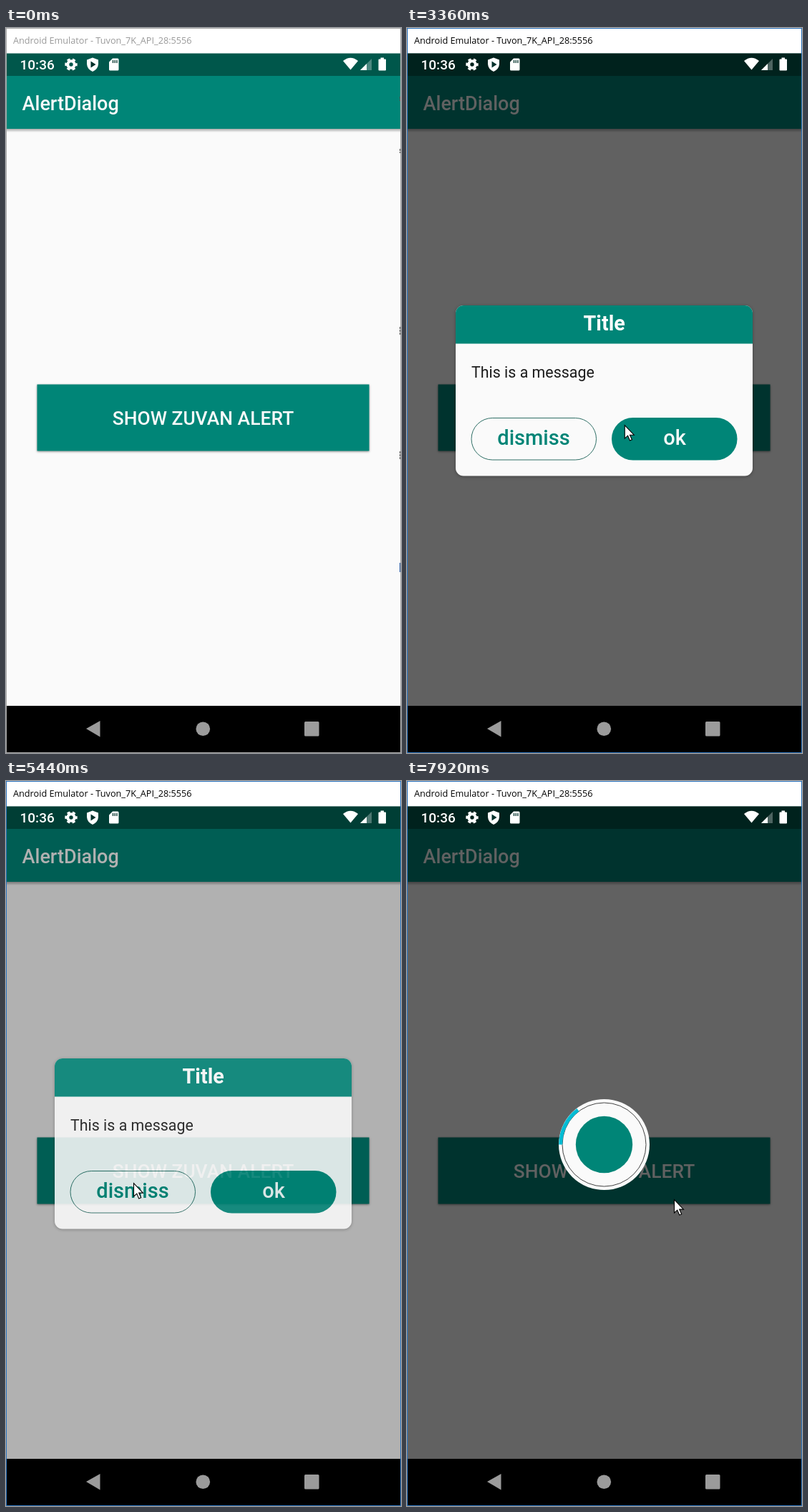
These frames come from a looping animation (552x1014 px, 8 s). An HTML page:

```html
<!DOCTYPE html>
<html lang="en">
<head>
<meta charset="utf-8">
<title>AlertDialog demo</title>
<style>
  html, body { margin: 0; width: 100%; height: 100%; overflow: hidden; background: #fff; }
  svg { display: block; width: 552px; height: 1014px; }
  text { font-family: Roboto, sans-serif; font-weight: 500; }
  .mid { text-anchor: middle; }
  #button { filter: drop-shadow(0 1px 1.5px rgba(0, 0, 0, .45)); }
  #dialog { filter: drop-shadow(0 1px 2px rgba(0, 0, 0, .3)); }
</style>
</head>
<body>
<svg viewBox="0 0 552 1014">
  <defs>
    <linearGradient id="shade" x2="0" y2="1">
      <stop stop-opacity=".32"/><stop offset="1" stop-opacity="0"/>
    </linearGradient>
    <clipPath id="window"><rect id="windowBox" width="552" height="1014"/></clipPath>
    <clipPath id="panel"><rect x="68" y="388" width="415" height="238.5" rx="11"/></clipPath>
    <clipPath id="dismissPill"><rect x="89.5" y="545" width="175.5" height="59.5" rx="29.7"/></clipPath>
    <clipPath id="okPill"><rect x="286" y="545" width="175.5" height="59.5" rx="29.7"/></clipPath>
  </defs>

  <!-- App screen -->
  <rect width="552" height="1014" fill="#fff"/>
  <text id="caption" x="10" y="22.3" style="font:400 12.7px 'Open Sans',sans-serif">Android Emulator - Tuvon_7K_API_28:5556</text>
  <rect y="36" width="552" height="912" fill="#fafafa"/>
  <rect y="35.5" width="552" height="32" fill="#00574b"/>
  <rect y="67" width="552" height="74" fill="#008577"/>
  <rect y="141" width="552" height="5" fill="url(#shade)"/>
  <text x="22.5" y="114.5" font-size="27" fill="#fafafa">AlertDialog</text>
  <g id="button"><rect x="43.5" y="498.5" width="464" height="93" fill="#008577"/></g>
  <text class="mid" x="275.5" y="555" font-size="26.4" fill="#fafafa">SHOW ZUVAN ALERT</text>
  <rect id="dim" y="35.5" width="552" height="913"/>

  <!-- Status bar -->
  <g fill="#fff">
    <text x="19.5" y="58" font-size="19">10:36</text>
    <g fill="none" stroke="#fff">
      <circle cx="91" cy="51" r="4.7" stroke-width="4"/>
      <circle cx="91" cy="51" r="7.3" stroke-width="2.8" stroke-dasharray="4.2 3.445" stroke-dashoffset="2.1"/>
    </g>
    <path d="M121 41.5L129 44.5V50.5Q128.500 57.500 121 61Q113.500 57.500 113 50.500V44.500Z"/>
    <path d="M118.500 46.500V55.500L125.500 51Z" fill="#00302a"/>
    <path d="M149 42.500H156Q157.500 42.500 157.500 44V58Q157.500 59.500 156 59.500H145.500Q144 59.500 144 58V47.500Z"/>
    <path d="M149.500 45V49M152.200 45V49M154.900 45V49" stroke="#00302a" stroke-width="1.300"/>
    <path d="M471 46Q481.500 37.500 492 46L481.500 58.500Z"/>
    <path d="M511 43V59H495Z" opacity=".3"/>
    <path d="M504 50V59H495Z"/>
    <path d="M523.500 41.500H528V43.500H530Q531 43.500 531 44.500V58.500Q531 59.500 530 59.500H521.500Q520.500 59.500 520.500 58.500V44.500Q520.500 43.500 521.500 43.500H523.500Z"/>
  </g>

  <!-- Navigation bar -->
  <rect y="948" width="552" height="66"/>
  <g fill="#9b9b9b">
    <path d="M112 980L131.500 969V991.500Z"/>
    <circle cx="275.300" cy="980.300" r="9.800"/>
    <rect x="417" y="970" width="20.500" height="20.500" rx="1.500"/>
  </g>

  <!-- Alert -->
  <g clip-path="url(#window)">
    <g id="dialog">
      <g clip-path="url(#panel)">
        <rect x="68" y="388" width="415" height="239" fill="#fafafa"/>
        <rect x="68" y="388" width="415" height="53.500" fill="#008577"/>
      </g>
      <text class="mid" x="275.700" y="423" font-size="28.700" fill="#fff" style="font-weight:700">Title</text>
      <text x="90" y="489" font-size="21.400" fill="#1b1b1b" style="font-weight:400">This is a message</text>
      <circle id="dismissRipple" cx="172" cy="575" fill="#e91e63" opacity=".48" clip-path="url(#dismissPill)"/>
      <rect x="90" y="545.500" width="174.500" height="58.500" rx="29.200" fill="none" stroke="#2f6f66"/>
      <text class="mid" x="177" y="582.500" font-size="29" fill="#008577">dismiss</text>
      <rect x="286" y="545" width="175.500" height="59.500" rx="29.700" fill="#008577"/>
      <text class="mid" x="374" y="582.500" font-size="29" fill="#fafafa">ok</text>
      <circle id="okRipple" cx="369" cy="575" fill="#e91e63" opacity=".48" clip-path="url(#okPill)"/>
    </g>
  </g>

  <!-- Loader -->
  <g id="loader">
    <circle cx="275.500" cy="508.500" r="63.500" fill="#fafafa"/>
    <circle cx="275.500" cy="508.500" r="58.500" fill="none" stroke="#444"/>
    <circle cx="275.500" cy="508.500" r="39.700" fill="#008577"/>
    <path id="arc" fill="none" stroke="#00bcd4" stroke-width="5"/>
  </g>

  <g id="specks">
    <path d="M551 96V102M551 169V175M551 418V430M551 592V604" stroke="#555" stroke-width="2" stroke-dasharray="3 1"/>
    <path d="M551 748V761" stroke="#2456a0" stroke-width="2"/>
  </g>
  <rect id="border" x=".5" y=".5" width="551" height="1013" fill="none"/>
  <path id="cursor" d="M0 0V18.500L4.300 14.600 7.200 21.500 10.200 20.200 7.200 13.600H13Z" fill="#fff" stroke="#000" stroke-width="1.100"/>
</svg>

<script>
const LOOP = 8000, STEP = 80;
const el = id => document.getElementById(id);
const set = (id, attrs) => { for (const k in attrs) el(id).setAttribute(k, attrs[k]); };
const show = (id, on) => set(id, { visibility: on ? 'visible' : 'hidden' });

// Linear interpolation through [time, value] keys, held outside them.
function track(t, keys) {
  if (t <= keys[0][0]) return keys[0][1];
  for (let i = 1; i < keys.length; i++) {
    const [t0, a] = keys[i - 1], [t1, b] = keys[i];
    if (t <= t1) return a + (b - a) * (t - t0) / (t1 - t0);
  }
  return keys[keys.length - 1][1];
}

// Pointer moves: start, end, destination, easing.
const easeOut = p => 1 - (1 - p) ** 2;
const smooth = p => p * p * (3 - 2 * p);
const moves = [
  [720, 1040, 297, 553, easeOut],
  [3280, 3680, 362, 573, smooth],
  [3760, 4000, 168, 565, smooth],
  [4640, 4880, 178, 562, smooth],
  [5600, 6320, 373, 585, smooth]
];

function pointer(t) {
  let x = 538, y = 770;
  for (const [start, end, toX, toY, ease] of moves) {
    const p = ease(Math.min(1, Math.max(0, (t - start) / (end - start))));
    x += (toX - x) * p;
    y += (toY - y) * p;
  }
  return [x, y];
}

function arcPath(from, sweep) {
  const point = deg => {
    const a = deg * Math.PI / 180;
    return `${275.5 + 60.8 * Math.cos(a)} ${508.5 + 60.8 * Math.sin(a)}`;
  };
  return `M${point(from)}A60.8 60.8 0 0 1 ${point(from + sweep)}`;
}

const dimKeys = [
  [2320, 0], [2400, .295], [2480, .5], [2560, .61], [4320, .61], [4400, .3], [4480, .03], [4560, 0],
  [5360, 0], [5440, .295], [5520, .5], [5600, .61]
];
const dialogKeys = [
  [2320, 0], [2400, .875], [2480, 1], [4320, 1], [4400, .35], [4480, 0],
  [5360, 0], [5440, .875], [5520, 1]
];
const pressKeys = [
  [1840, 0], [2080, 1], [2320, 1], [2400, 0], [5040, 0], [5280, 1], [5360, 1], [5440, 0]
];

function draw(t) {
  const active = t >= 1920;
  set('caption', { fill: active ? '#000' : '#999' });
  set('border', { stroke: active ? '#2d74bd' : '#aaa' });
  show('specks', t < 80);

  const press = track(t, pressKeys);
  el('button').style.filter =
    `drop-shadow(0 ${1 + 2 * press}px ${1.5 + 2 * press}px rgba(0,0,0,.45))`;
  set('dim', { opacity: track(t, dimKeys) });

  const loading = t >= 6960;
  const closing = t >= 6880;
  show('dialog', !loading);
  set('dialog', {
    opacity: track(t, dialogKeys),
    transform: `translate(0 ${closing ? 42 : 0})`
  });
  set('windowBox', { height: closing ? 607 : 1014 });
  set('dismissRipple', { r: t < 5000 ? track(t, [[4080, 0], [4320, 125]]) : 0 });
  set('okRipple', { r: track(t, [[6640, 0], [6880, 87]]) });

  show('loader', loading);
  set('arc', { d: arcPath(180 + (t - 7920) / 4, 53) });

  const [x, y] = pointer(t);
  show('cursor', t >= 720);
  set('cursor', { transform: `translate(${x + .5} ${y + .5})` });
}

function tick() {
  draw(Math.floor(performance.now() % LOOP / STEP) * STEP);
  requestAnimationFrame(tick);
}
tick();
</script>
</body>
</html>
```
